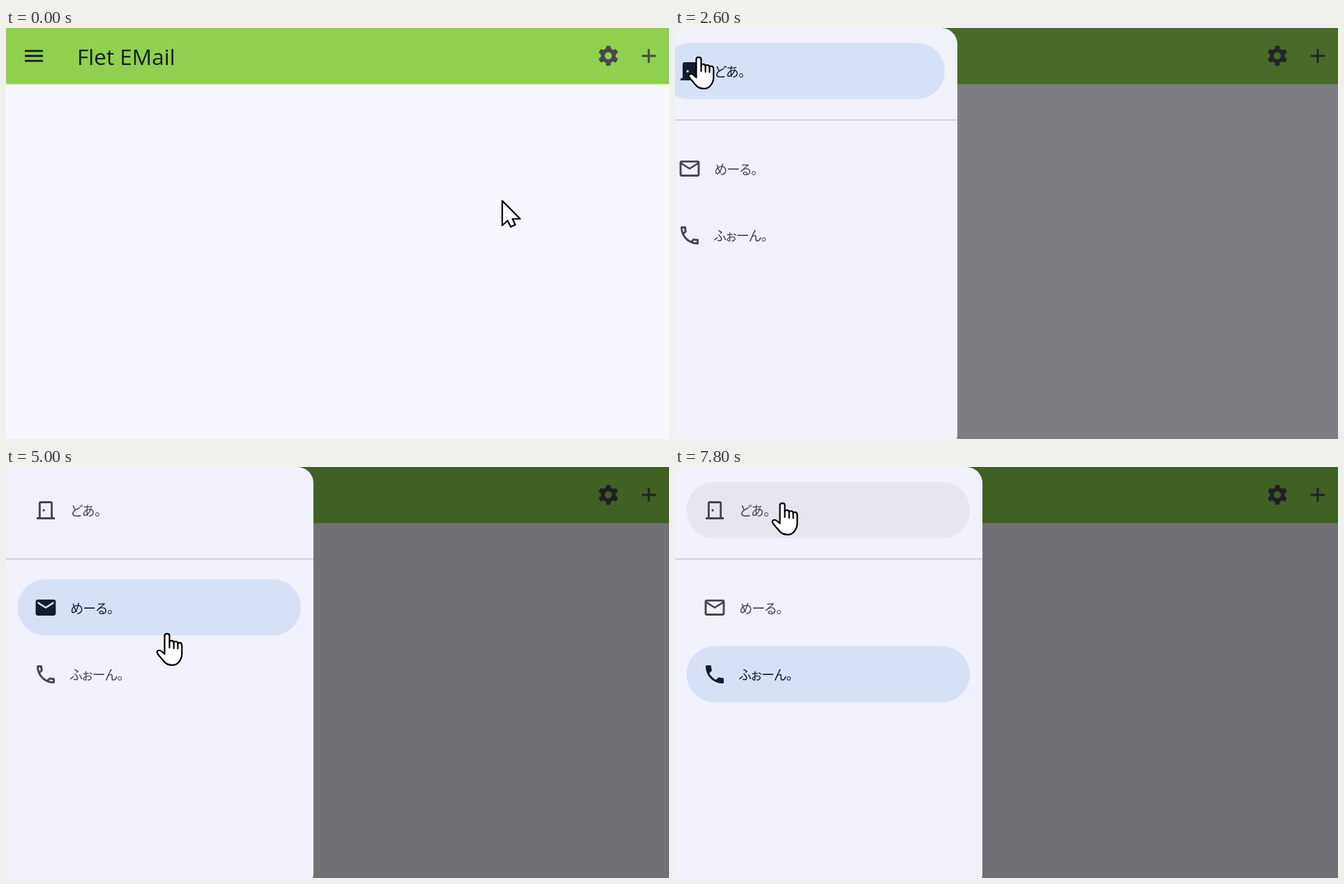
Animation of 951x589 px, one loop 8000 ms. Source, as an HTML page:

```html
<!DOCTYPE html>
<html lang="ja">
<head>
<meta charset="utf-8">
<title>Navigation drawer</title>
<style>
  html, body { margin: 0; width: 100%; height: 100%; overflow: hidden; background: #f7f7ff; }
  svg { display: block; width: 951px; height: 589px; }
  .title { font: 31.5px "Open Sans", "Noto Sans", sans-serif; fill: #1b1c1f; }
  .label { font: 500 19px "Noto Sans CJK JP", "Noto Sans CJK", sans-serif;
           font-feature-settings: "palt"; letter-spacing: -.5px; }
  .item { fill: #44464f; }
  .item.selected { fill: #111c2c; }
  .cursor { fill: #fff; stroke: #000; stroke-width: 2.2; stroke-linejoin: round; stroke-linecap: round; }
</style>
</head>
<body>
<svg viewBox="0 0 951 589">
  <rect width="951" height="589" fill="#f7f7ff"/>
  <rect width="951" height="80.5" fill="#8fd14f"/>
  <circle id="menuHover" cx="40" cy="40" r="40.3" fill="#1d1b20" opacity=".105"/>
  <circle id="menuRipple" cx="33" cy="40" r="20.5" fill="#1d1b20" opacity=".09"/>
  <path d="M27 32.8h26M27 40h26M27 47.2h26" stroke="#1b1b1f" stroke-width="2.8"/>
  <text class="title" x="102" y="53.3">Flet EMail</text>
  <g id="gear" transform="translate(864 39.8)" fill="#44464f" stroke="#44464f" stroke-linejoin="round">
    <circle r="7.9" fill="none" stroke-width="5.6"/>
  </g>
  <path d="M911.9 40h20.2M922 29.9v20.2" stroke="#44464f" stroke-width="2.8"/>

  <rect id="scrim" width="951" height="589"/>
  <g id="drawer">
    <rect x="-60" width="501" height="605" rx="23" fill="#f0f1fa"/>
    <rect y="131" width="441" height="1.5" fill="#c6c8d2"/>
  </g>
  <path id="arrow" class="cursor" d="M.8 1.5V37L8.5 30 13 39 19.5 36 15.5 27.5H26.5Z"/>
  <g id="hand" class="cursor">
    <path d="M-3.5 4Q-3.5 .9 0 .9T3.5 4V13Q4 10.8 6.5 10.8 9.5 10.8 9.7 14 10 12 12.3 12 15.3 12 15.5 15.3
             16 13.6 18 13.6 21 13.8 21.3 17.5V30Q21.3 37 16 42.5 13 45.8 8 45.8 0 46 -4 41L-13 30.5
             Q-15.6 27 -13 25.2 -10.5 24 -8 26L-3.5 30Z"/>
    <path fill="none" d="M3.5 13v8M9.7 14v8M15.5 15.3v7"/>
  </g>
</svg>
<script>
const $ = id => document.getElementById(id);
const add = (parent, tag, attrs) => {
  const node = document.createElementNS('http://www.w3.org/2000/svg', tag);
  for (const key in attrs) node.setAttribute(key, attrs[key]);
  return parent.appendChild(node);
};
const show = (node, on) => node.setAttribute('visibility', on ? 'inherit' : 'hidden');
const move = (node, x, y) => node.setAttribute('transform', `translate(${x} ${y})`);

const DURATION = 8000, STEP = 200;
const OPEN = 2600;

for (let a = 0; a < 360; a += 60)
  add($('gear'), 'path', { d: 'M-3.2-9.5L-2.6-13.8H2.6L3.2-9.5Z', transform: `rotate(${a})` });

const door = 'M19 19V5c0-1.1-.9-2-2-2H7c-1.1 0-2 .9-2 2v14H3v2h18v-2h-2z';
const items = [
  { label: 'どあ。', top: 21.5,
    filled: door + 'M11 13H9v-2h2z',
    outlined: door + 'M17 19H7V5h10zM9 11h2v2H9z' },
  { label: 'めーる。', top: 161,
    filled: 'M20 4H4c-1.1 0-2 .9-2 2v12c0 1.1.9 2 2 2h16c1.1 0 2-.9 2-2V6c0-1.1-.9-2-2-2zm0 4l-8 5-8-5V6l8 5 8-5z',
    outlined: 'M22 6c0-1.1-.9-2-2-2H4c-1.1 0-2 .9-2 2v12c0 1.1.9 2 2 2h16c1.1 0 2-.9 2-2zm-2 0l-8 5-8-5zm0 12H4V8l8 5 8-5z' },
  { label: 'ふぉーん。', top: 256.8,
    filled: 'M6.6 10.8c1.4 2.8 3.8 5.1 6.6 6.6l2.2-2.2c.3-.3.7-.4 1-.2 1.1.4 2.3.5 3.6.5.6 0 1 .5 1 1V20c0 .6-.4 1-1 1C10.600 21 3 13.400 3 4c0-.6.400-1 1-1h3.500c.6 0 1 .400 1 1 0 1.300.200 2.500.600 3.600.1.400 0 .700-.3 1z',
    outlined: 'M7.5 3H4c-.6 0-1 .4-1 1 0 9.4 7.6 17 17 17 .6 0 1-.4 1-1v-3.5c0-.6-.4-1-1-1-1.200 0-2.400-.2-3.600-.6-.400-.1-.700 0-1 .300l-2.200 2.200c-2.800-1.500-5.200-3.800-6.600-6.600l2.200-2.200c.3-.3.4-.7.3-1C8.700 6.400 8.500 5.200 8.500 4c0-.6-.4-1-1-1zM6.500 5c.1.900.2 1.800.5 2.600L5.800 8.800C5.400 7.600 5.100 6.300 5 5zM16.400 17c.900.200 1.700.400 2.600.500V19c-1.300-.1-2.600-.4-3.800-.8z' },
];
items.forEach((item, i) => {
  const g = item.node = add($('drawer'), 'g', { class: 'item', transform: `translate(0 ${item.top})` });
  const pill = fill => add(g, 'rect', { x: 16.5, width: 406.5, height: 80.5, rx: 40.25, fill });
  const clip = add(g, 'clipPath', { id: 'clip' + i });
  add(clip, 'rect', { x: 16.5, width: 406.5, height: 80.5, rx: 40.25 });
  item.hover = pill('#e7e5ed');
  item.ripple = add(g, 'circle', { r: 64, fill: '#000', opacity: .013, 'clip-path': `url(#clip${i})` });
  item.indicator = pill('#d6e1f5');
  item.icon = add(g, 'path', { 'fill-rule': 'evenodd', transform: 'translate(39.7 23.2) scale(1.44)' });
  add(g, 'text', { class: 'label', x: 92, y: 48.5 }).textContent = item.label;
});

// Item chosen from each time on; the ripple shows one step earlier.
const selections = [{ at: 0, index: 0 }, { at: 4800, index: 1 }, { at: 6800, index: 2 }];

// Pointer hot spot: time, x, y
const path = [
  [0, 711, 246], [400, 590, 222], [800, 320, 165], [1200, 133, 130], [1600, 60, 75], [2000, 34, 41],
  [2800, 34, 41], [3200, 90, 95], [3800, 190, 185], [4200, 212, 196], [4800, 212, 196],
  [5200, 250, 280], [5600, 264, 310], [6000, 235, 313], [6200, 213, 312], [6800, 213, 312],
  [7200, 177, 238], [7600, 156, 70], [7800, 154, 51], [8000, 154, 51],
];
function pointerAt(t) {
  const i = path.findIndex(p => p[0] > t);
  const [t0, x0, y0] = path[i - 1], [t1, x1, y1] = path[i];
  const k = (t - t0) / (t1 - t0);
  return [x0 + (x1 - x0) * k, y0 + (y1 - y0) * k];
}

function draw(t) {
  const [x, y] = pointerAt(t);
  const open = t >= OPEN, opening = t === OPEN;
  const overMenu = !open && Math.hypot(x - 40, y - 40) < 40;
  show($('menuHover'), overMenu);
  show($('menuRipple'), t === OPEN - STEP);
  show($('scrim'), open);
  $('scrim').setAttribute('opacity', opening ? .495 : .54);
  show($('drawer'), open);
  move($('drawer'), opening ? -36 : 0, 0);

  const current = selections.filter(s => s.at <= t).pop();
  const next = selections.find(s => s.at === t + STEP);
  const fresh = current.at === t;
  let overItem = false;
  items.forEach((item, i) => {
    const selected = i === current.index;
    const over = open && x > 16 && x < 423 && y >= item.top && y < item.top + 80.5;
    overItem ||= over;
    item.node.classList.toggle('selected', selected);
    item.icon.setAttribute('d', selected ? item.filled : item.outlined);
    show(item.hover, over && (!selected || fresh));
    item.hover.setAttribute('fill', selected ? '#dbdbe0' : '#e7e5ed');
    show(item.indicator, selected);
    const sx = fresh && t ? .922 : 1;
    item.indicator.setAttribute('transform', `translate(${219.75 * (1 - sx)} 0) scale(${sx} 1)`);
    show(item.ripple, next && next.index === i);
    item.ripple.setAttribute('cx', x);
    item.ripple.setAttribute('cy', y - item.top);
  });

  const hand = overMenu || overItem;
  show($('hand'), hand);
  show($('arrow'), !hand);
  move($('hand'), x, y);
  move($('arrow'), x, y);
}

function tick() {
  draw(Math.floor(performance.now() % DURATION / STEP) * STEP);
  requestAnimationFrame(tick);
}
tick();
</script>
</body>
</html>
```
